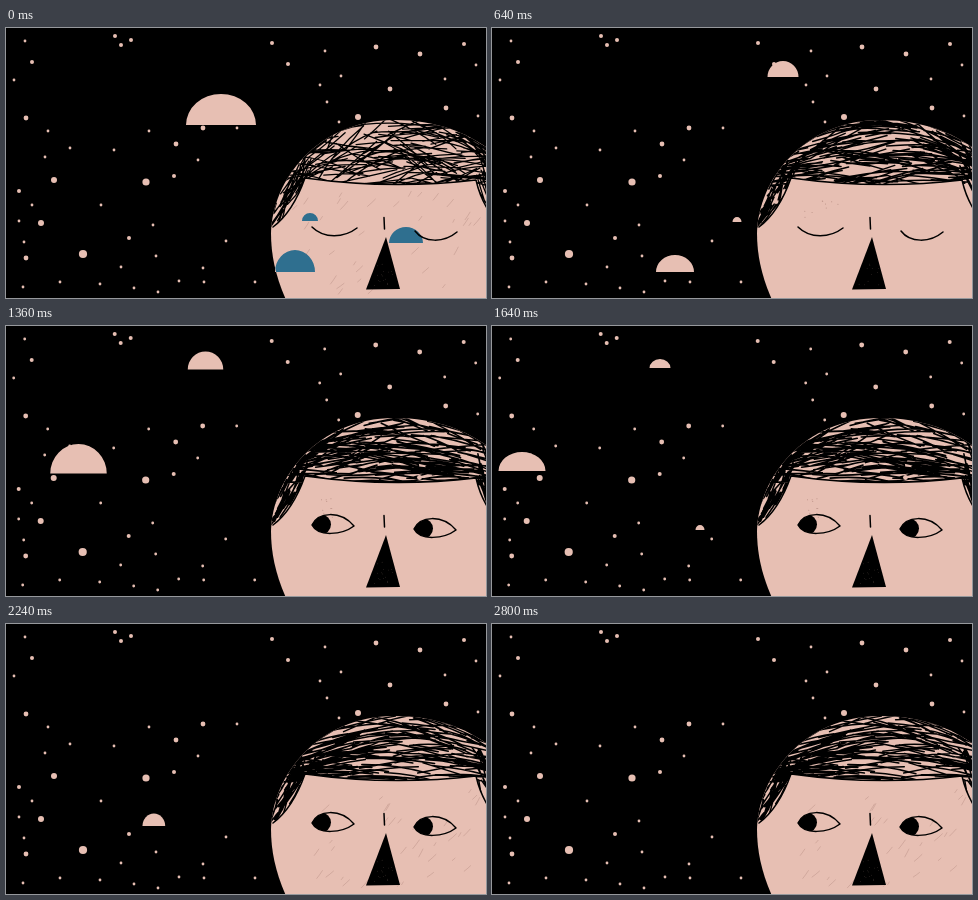
These frames come from a looping animation (480x270 px, 2880 ms). An HTML page:

```html
<!DOCTYPE html>
<html lang="en">
<head>
<meta charset="utf-8">
<title>Night thoughts</title>
<style>
html, body { margin: 0; width: 100%; height: 100%; overflow: hidden; background: #000; }
svg { display: block; width: 100vw; height: 100vh; }
.ink { fill: none; stroke: #000; stroke-width: 1.5; stroke-linecap: round; stroke-linejoin: round; }
</style>
</head>
<body>
<svg viewBox="0 0 480 270">
  <defs>
    <path id="skull" d="M265 205C266 152 312 92 388 92C434 92 464 107 484 122V274H281C270 250 265 228 265 205Z"/>
    <path id="eye" d="M306 199C312 186 334 184 348 200C336 209 312 211 306 199Z"/>
    <clipPath id="inHead"><use href="#skull"/></clipPath>
    <clipPath id="inEye"><use href="#eye"/></clipPath>
    <clipPath id="inHair"><path d="M255 203L267 199Q287 184 299 150Q385 162 470 152Q474 170 484 185V80H255Z"/></clipPath>
    <g id="openEye">
      <circle cx="315" cy="198.500" r="10" clip-path="url(#inEye)"/>
      <use href="#eye" class="ink"/>
    </g>
  </defs>
  <rect width="480" height="270"/>
  <g id="stars" fill="#e7bfb3"></g>
  <path id="skyDomes" fill="#e7bfb3"/>
  <use href="#skull" fill="#e7bfb3"/>
  <g clip-path="url(#inHead)">
    <path id="faceDomes" fill="#2f6f8f"/>
    <g id="grain"></g>
    <g id="hair" clip-path="url(#inHair)"></g>
    <path class="ink" d="M267 199Q287 184 299 150Q385 162 470 152Q474 170 484 185"/>
    <circle id="gap" cx="413.500" cy="151.500" r="2.400" fill="#e7bfb3"/>
  </g>
  <g id="closed" class="ink">
    <path d="M306 199C318 211 338 210 351 200"/>
    <path d="M409 203C418 215 438 215 451 204"/>
  </g>
  <g id="open">
    <use href="#openEye"/>
    <use href="#openEye" x="102" y="4"/>
  </g>
  <path class="ink" d="M378 189.500L378.500 201"/>
  <path d="M380 209L394 261L360 261.500Z"/>
  <g id="specks" fill="#e7bfb3" opacity=".35"></g>
</svg>
<script>
const LOOP = 2880, STEP = 40;
const $ = id => document.getElementById(id);
const show = (el, on) => el.setAttribute('display', on ? 'inline' : 'none');

function rng(seed) {
  return () => {
    seed = (seed + 0x6D2B79F5) | 0;
    let n = Math.imul(seed ^ seed >>> 15, 1 | seed);
    n = n + Math.imul(n ^ n >>> 7, 61 | n) ^ n;
    return ((n ^ n >>> 14) >>> 0) / 4294967296;
  };
}

// Star positions grouped by radius
const stars = [
  [4.1, [77, 226]],
  [3.6, [140, 154]],
  [3, [352, 89, 48, 152, 35, 195]],
  [2.4, [20, 90, 197, 100, 170, 116, 20, 230, 384, 61, 370, 19, 414, 26, 440, 80]],
  [2, [26, 34, 115, 17, 266, 15, 458, 16, 168, 148, 13, 163, 123, 210, 282, 36, 125, 12, 109, 8]],
  [1.4, [8, 52, 19, 13, 319, 23, 335, 48, 314, 57, 321, 74, 439, 51, 470, 37, 472, 88, 333, 94,
    231, 100, 143, 103, 192, 132, 64, 120, 42, 103, 39, 129, 108, 122, 95, 177, 147, 197,
    13, 193, 18, 214, 26, 177, 220, 213, 150, 228, 54, 254, 17, 259, 94, 256, 115, 239,
    128, 260, 152, 264, 173, 253, 198, 254, 249, 254, 197, 240]]
];

// Each dome: keys of time, centre x, base y, width, height
const domes = [
  [[0, 215, 97, 70, 31], [520, 145, 97, 0, 0]],
  [[0, 400, 215, 34, 16], [480, 340, 215, 0, 0]],
  [[0, 289, 244, 40, 22], [320, 238, 244, 50, 25], [640, 183, 244, 38, 17], [1080, 136, 243, 14, 7], [1240, 120, 243, 0, 0]],
  [[0, 304, 193, 16, 8], [260, 280, 193, 20, 10], [640, 245, 194, 9, 5], [760, 233, 194, 0, 0]],
  [[440, 318, 50, 0, 0], [640, 291, 49, 31, 16], [1080, 231, 45, 50, 27], [1640, 168, 42, 21, 9], [1800, 150, 41, 0, 0]],
  [[680, 176, 154, 0, 0], [1080, 115, 150, 66, 40], [1640, 30, 145, 47, 19], [1960, -8, 143, 20, 9], [2080, -22, 142, 0, 0]],
  [[1600, 212, 204, 0, 0], [1640, 208, 204, 9, 5], [1960, 178, 203, 40, 22], [2480, 122, 201, 8, 4], [2560, 114, 201, 0, 0]]
];

function domePath(keys, t) {
  const i = keys.findIndex((k, n) => n && t >= keys[n - 1][0] && t < k[0]);
  if (i < 0) return '';
  const a = keys[i - 1], b = keys[i], u = (t - a[0]) / (b[0] - a[0]);
  const [, x, y, w, h] = a.map((v, n) => v + (b[n] - v) * u);
  return w < 1 ? '' : `M${x - w / 2} ${y}A${w / 2} ${h} 0 0 1 ${x + w / 2} ${y}Z`;
}

function line(x, y, angle, len, bend) {
  const dx = Math.cos(angle) * len / 2, dy = Math.sin(angle) * len / 2;
  const n = v => v.toFixed(1);
  return `M${n(x - dx)} ${n(y - dy)}Q${n(x - dy * bend)} ${n(y + dx * bend)} ${n(x + dx)} ${n(y + dy)}`;
}

// One drawing of the scribbled hair
function scribble(seed, count, spread, width) {
  const r = rng(seed), mid = () => r() + r() - 1;
  let d = '';
  for (let i = 0; i < count; i++) {
    const x = 282 + r() * 204, top = 92 + ((x - 390) / 125) ** 2 * 40;
    const y = top + r() * (157 - top);
    const slope = (x - 390) / 125 * .75 * (157 - y) / 45;
    d += line(x, y, slope + mid() * spread, 30 + r() * 45, mid() * .2 - .05);
  }
  for (let i = 0; i < 32; i++) {
    const u = r();
    d += line(297 - u * 28 + mid() * 11, 140 + u * 52, 2.05 + mid() * .3, 18 + r() * 18, -.1);
  }
  for (let i = 0; i < 12; i++) d += line(474 + r() * 10, 125 + r() * 45, 1.2 + mid() * .3, 28, 0);
  return `<path class="ink" style="stroke-width:${width}" d="${d}"/>`;
}

function scratches(seed) {
  const r = rng(seed);
  let d = '';
  for (let i = 0; i < 34; i++) d += line(285 + r() * 195, 165 + r() * 100, -.6 - r() * .5, 3 + r() * 8, .05);
  return `<path class="ink" style="stroke:#8a5f55;stroke-width:.6;opacity:.4" d="${d}"/>`;
}

function dots(seed, count, x, y, w, h, size) {
  const r = rng(seed);
  let s = '';
  for (let i = 0; i < count; i++) s += `<circle cx="${x + r() * w}" cy="${y + r() * h}" r="${size}"/>`;
  return s;
}

const layers = (host, list) => {
  host.innerHTML = list.map(s => `<g>${s}</g>`).join('');
  return [...host.children];
};
const pick = (list, n) => list.forEach((el, i) => show(el, i === n));

$('stars').innerHTML = stars.map(([r, p]) => {
  let s = '';
  for (let i = 0; i < p.length; i += 2) s += `<circle cx="${p[i]}" cy="${p[i + 1]}" r="${r}"/>`;
  return s;
}).join('');

const hair = layers($('hair'), [
  scribble(11, 150, .85, 1.3),
  scribble(23, 165, .4, 1.5),
  scribble(37, 180, .42, 1.6),
  scribble(52, 175, .32, 1.5)
]);
const faint = s => `<g fill="#8a5f55" opacity=".5">${s}</g>`;
const grain = layers($('grain'), [
  scratches(5), scratches(9),
  faint(dots(3, 9, 312, 172, 18, 22, .5)),
  faint(dots(8, 9, 305, 172, 50, 18, .5))
]);
const specks = layers($('specks'), [dots(4, 16, 367, 236, 20, 22, .4), dots(6, 12, 367, 236, 20, 22, .4)]);

function draw(time) {
  let t = Math.floor(time / STEP) * STEP;
  if (t >= 2480 && t < 2560) t = 2480;
  const awake = t >= 840;
  const alt = awake ? +(t % 280 < 140) : Math.floor(t / 120) % 2;
  pick(hair, awake ? 2 + alt : alt);
  pick(grain, (t > 400 && t < 1800 ? 2 : 0) + alt);
  pick(specks, t < 1800 ? alt : 1 - alt);
  show($('gap'), awake && !alt);
  show($('closed'), !awake);
  show($('open'), awake);
  $('stars').setAttribute('transform', `translate(${awake && !alt ? -.3 : 0} 0)`);
  const d = domes.map(k => domePath(k, t)).join('') || 'M0 0';
  $('skyDomes').setAttribute('d', d);
  $('faceDomes').setAttribute('d', d);
}

const start = performance.now();
function tick() {
  draw((performance.now() - start) % LOOP);
  requestAnimationFrame(tick);
}
tick();
</script>
</body>
</html>
```
